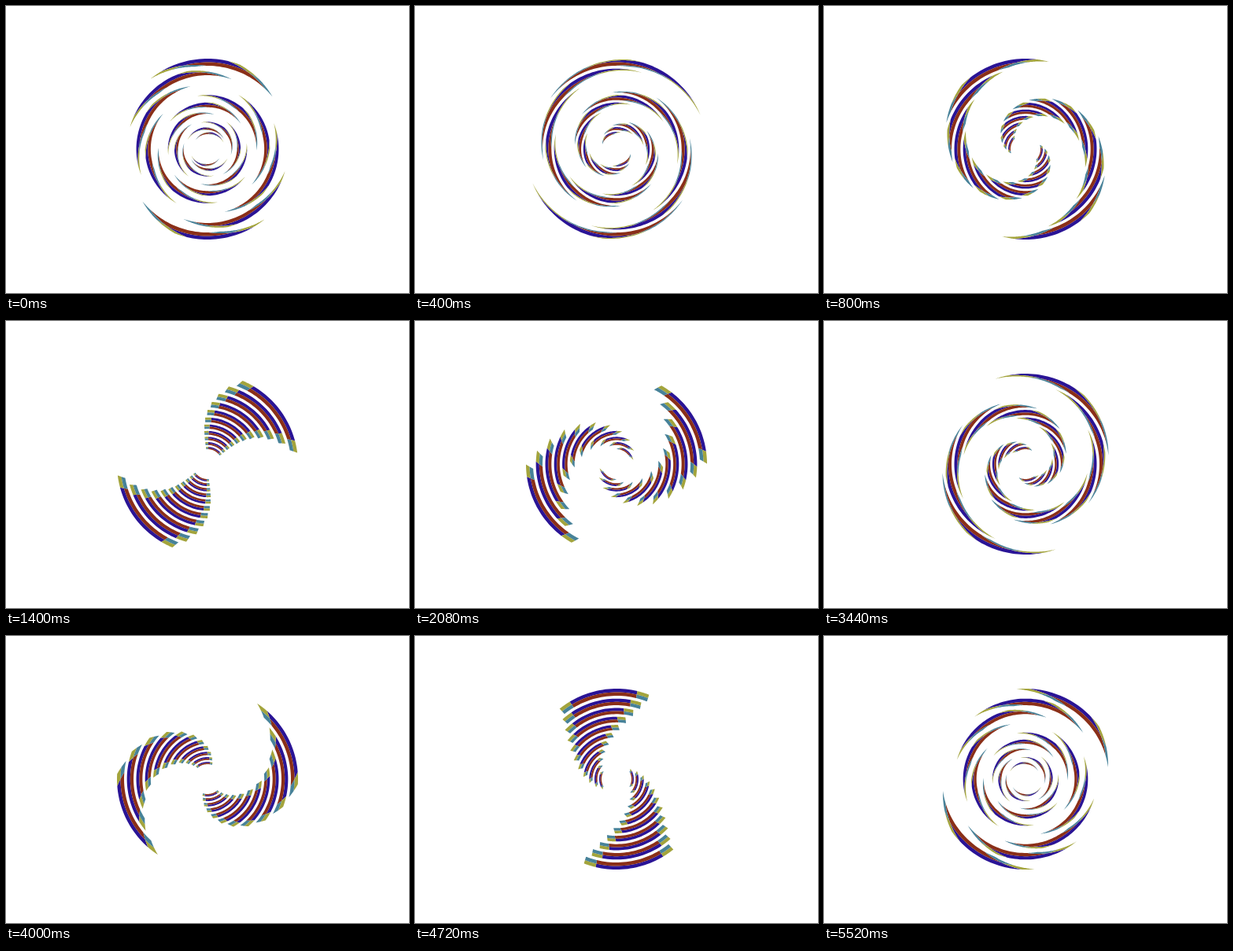
Animation, 512 px wide and 365 px high, one loop 5560 ms. Source, as an HTML page with a canvas:

```html
<!DOCTYPE html>
<html lang="en">
<head>
<meta charset="utf-8">
<title>Twisting rings</title>
<style>
  html, body { margin: 0; width: 100%; height: 100%; overflow: hidden; background: #fff; }
  canvas { display: block; }
</style>
</head>
<body>
<canvas id="stage" width="512" height="365"></canvas>
<script>
const ctx = document.getElementById('stage').getContext('2d');
const STEP = 40, STEPS = 139, RINGS = 11;
const CX = 256, CY = 182, SPAN = 60, CAP = 0.13;
const BLUE = '#2a1496', RED = '#8a2f18', YELLOW = '#a3a43c', CYAN = '#478299';

// Two moments of rest; between them the rings wind up one way, then the other.
const RESTS = [
  { at: 114.6, angle: 65, dir: 1 },
  { at: 43.1, angle: 36, dir: -1 }
];

// Signed distance between two steps on the loop
function gap(a, b) {
  const d = (((a - b) % STEPS) + STEPS) % STEPS;
  return d > STEPS / 2 ? d - STEPS : d;
}

function pose(step) {
  const [p, q] = RESTS.map(r => Math.abs(gap(step, r.at)));
  const rest = RESTS[p < q ? 0 : 1];
  const turn = rest.dir * 0.2345 * Math.min(p, q) ** 2.3;
  return { start: rest.angle + turn, shear: -0.083 * turn };
}

// a runs along the arc, s from its outer to its inner edge
function patch(point, a0, a1, s0, s1, color) {
  const corners = [[a0, s0], [a1, s0], [a1, s1], [a0, s1]];
  ctx.beginPath();
  corners.forEach(([a, s], i) => {
    const [b, u] = corners[(i + 1) % 4];
    for (let k = 0; k < 24; k++) {
      const f = k / 24;
      ctx.lineTo(...point(a + (b - a) * f, s + (u - s) * f));
    }
  });
  ctx.fillStyle = color;
  ctx.fill();
}

function drawArc(start, shear, radius, width) {
  const point = (a, s) => {
    const t = (start + a * SPAN + shear * s) * Math.PI / 180;
    const r = radius - width * s;
    return [CX + r * Math.cos(t), CY - r * Math.sin(t)];
  };
  patch(point, CAP, 1 - CAP, 0, 0.5, BLUE);
  patch(point, CAP, 1 - CAP, 0.5, 1, RED);
  for (const a of [0, 1 - CAP]) {
    patch(point, a, a + CAP, 0, 0.5, YELLOW);
    patch(point, a, a + CAP, 0.5, 1, CYAN);
  }
}

function draw(now) {
  const step = Math.floor(now / STEP) % STEPS;
  ctx.clearRect(0, 0, 512, 365);
  for (let i = 0; i < RINGS; i++) {
    const m = RINGS - 1 - i;
    // Each ring is one step ahead of the ring around it
    const { start, shear } = pose(step + i);
    for (const half of [0, 180]) {
      drawArc(start + half, shear, 22 + 5.6 * m + 0.37 * m * m, 3 + 0.6 * m);
    }
  }
}

const begin = performance.now();
function tick() {
  draw(performance.now() - begin);
  requestAnimationFrame(tick);
}
tick();
</script>
</body>
</html>
```
